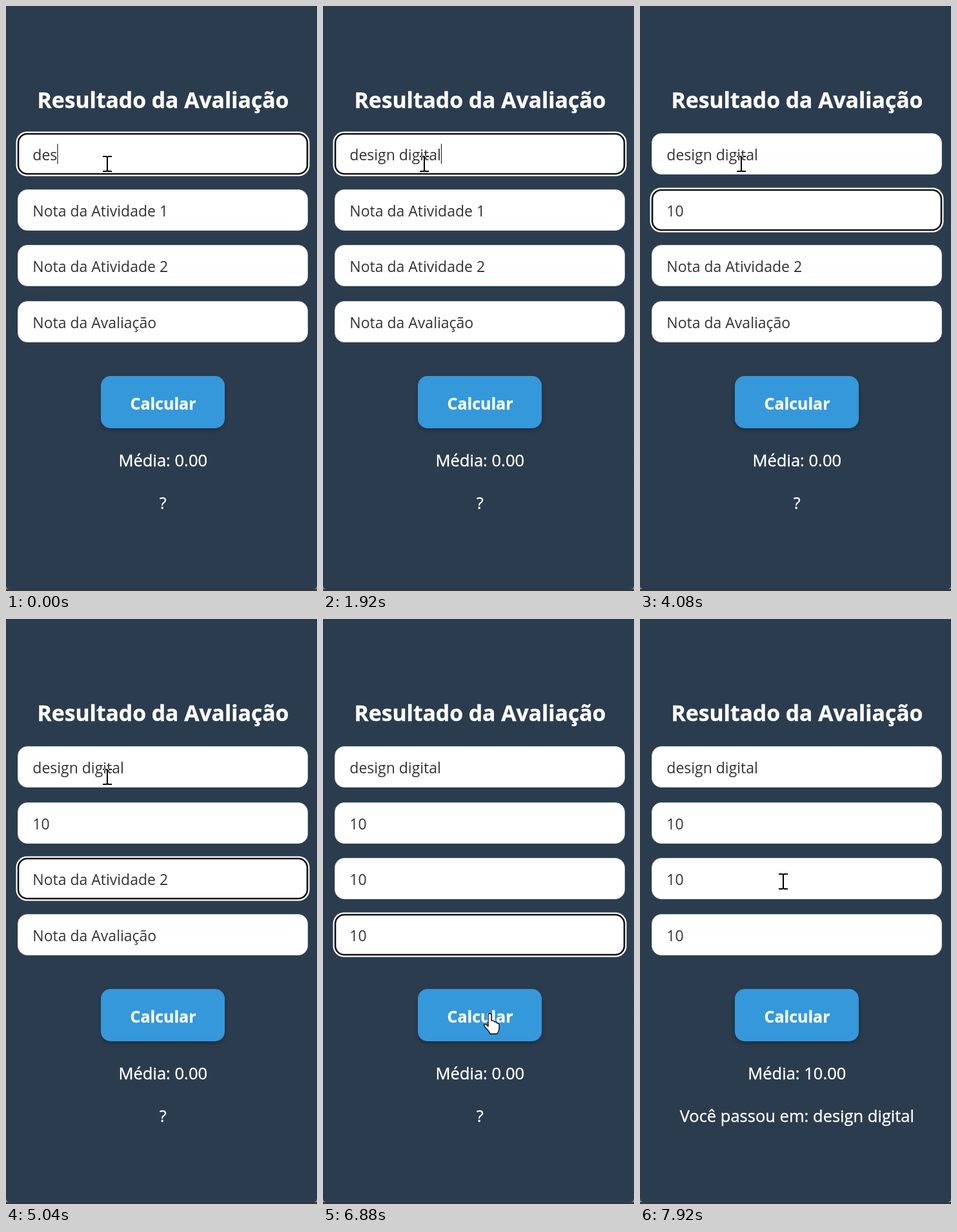
These frames come from a looping animation (482 by 906 pixels, 8 s). An HTML page:

```html
<!DOCTYPE html>
<html lang="pt-BR">
<head>
<meta charset="utf-8">
<title>Resultado da Avaliação</title>
<style>
  html, body { margin: 0; width: 100%; height: 100%; overflow: hidden; background: #8d9297; }
  svg { display: block; width: 482px; height: 906px; }
  text { font-family: "Open Sans", "Noto Sans", sans-serif; fill: #fff; white-space: pre; }
  .title { font-size: 33.7px; font-weight: 700; text-anchor: middle; stroke: #fff; stroke-width: .4; }
  .button { font-size: 25px; font-weight: 700; text-anchor: middle; stroke: #fff; stroke-width: .3; }
  .result { font-size: 25.5px; text-anchor: middle; stroke: #fff; stroke-width: .35; }
  .field text { font-size: 23px; fill: #333; }
  .box { fill: #fff; stroke: #d5d8dc; }
  .halo { fill: #fff; }
  .ring { fill: #fff; stroke: #101010; stroke-width: 2.6; }
  .caret { fill: #333; }
  .shadow { filter: drop-shadow(0 3px 3px rgba(0, 0, 0, .25)); }
  #ibeam { fill: none; stroke: #fff; stroke-width: 2; mix-blend-mode: difference; }
  #hand, #arrow { fill: #fff; stroke: #000; stroke-width: 1.3; stroke-linejoin: round; }
</style>
</head>
<body>
<svg viewBox="0 0 482 906">
  <path d="M0 0H482V897Q482 903 476 903H6Q0 903 0 897Z" fill="#2b3c4f"/>
  <path d="M0 903H482V906H0Z" fill="#33383e"/>
  <path d="M0 .5H482" stroke="#303a44"/>
  <path d="M481.5 0V897" stroke="#243240" stroke-dasharray="3 3"/>
  <text class="title" x="243.5" y="158">Resultado da Avaliação</text>
  <g id="form"></g>
  <rect class="shadow" x="147" y="573" width="192" height="81" rx="15" fill="#3498db"/>
  <text class="button" x="243.5" y="625">Calcular</text>
  <text class="result" id="mean" x="243.3" y="713"></text>
  <text class="result" id="verdict" x="243.3" y="779"></text>
  <path id="ibeam" d="M-7 -11H-2.5Q0 -11 0 -9Q0 -11 2.5 -11H7M0 -9V10M-7 12H-2.5Q0 12 0 10Q0 12 2.5 12H7"/>
  <path id="hand" d="M-2 1Q-2 -1 .5 -1Q3 -1 3 1V10Q7.5 9.5 7.5 12Q11.5 11.5 11.5 14Q15 13.5 15 17V22Q15 26 12 30.5H1Q-1 26 -5 22Q-9.5 17.5 -8 16Q-6 14.5 -2 19Z"/>
  <path id="arrow" d="M0 0V25L6 19.5L10 28.5L14 26.5L10.2 18H18Z"/>
</svg>
<script>
  const LOOP = 8000, CLICK = 6960, BLINK = 500, TEXT_X = 41.3;
  const $ = id => document.getElementById(id);

  // Each field: placeholder, typed value, focus time, time at which each key lands
  const subjectKeys = [...'design digital'].map((_, i) => Math.max(0, (i - 2) * 150));
  const fields = [
    { hint: 'Nome da Disciplina', value: 'design digital', focus: 0, keys: subjectKeys },
    { hint: 'Nota da Atividade 1', value: '10', focus: 2240, keys: [2720, 3200] },
    { hint: 'Nota da Atividade 2', value: '10', focus: 4500, keys: [5200, 5360] },
    { hint: 'Nota da Avaliação', value: '10', focus: 5600, keys: [5920, 6080] }
  ];

  function add(parent, tag, attrs) {
    const el = document.createElementNS('http://www.w3.org/2000/svg', tag);
    for (const k in attrs) el.setAttribute(k, attrs[k]);
    return parent.appendChild(el);
  }

  const show = (el, on) => el.style.display = on ? '' : 'none';
  const setText = (el, s) => { if (el.textContent !== s) el.textContent = s; };

  fields.forEach((f, i) => {
    f.top = Math.round(197 + i * 86.67);
    f.end = i < 3 ? fields[i + 1].focus : CLICK;
    const g = add($('form'), 'g', { class: 'field', transform: `translate(0 ${f.top})` });
    add(g, 'rect', { class: 'box', x: 18.5, y: .5, width: 449, height: 63, rx: 14.5 });
    f.outline = add(g, 'g', {});
    add(f.outline, 'rect', { class: 'halo', x: 15.5, y: -2.5, width: 455, height: 69, rx: 17 });
    add(f.outline, 'rect', { class: 'ring', x: 19, y: 1, width: 448, height: 62, rx: 14 });
    f.label = add(g, 'text', { x: TEXT_X, y: 42 });
    f.caret = add(g, 'rect', { class: 'caret', y: 16.5, width: 1.3, height: 31 });
  });

  function drawField(f, t) {
    const focused = t >= f.focus && t < f.end;
    const done = f.keys.filter(k => k <= t);
    const typed = f.value.slice(0, done.length);
    setText(f.label, typed || f.hint);
    show(f.outline, focused);
    const last = Math.max(f.focus, ...done);
    const lit = focused && (t - last) % (2 * BLINK) < BLINK;
    show(f.caret, lit);
    if (lit) f.caret.setAttribute('x', TEXT_X + (typed ? f.label.getComputedTextLength() : 0));
  }

  const stops = [
    { x: 157, y: 244 },
    { x: 258, y: 612, from: 6160, to: 6720 },
    { x: 222, y: 406, from: 7200, to: 7800 }
  ];

  function pointerAt(t) {
    let { x, y } = stops[0];
    for (const s of stops.slice(1)) {
      const p = Math.min(1, Math.max(0, (t - s.from) / (s.to - s.from)));
      const e = p * p * (3 - 2 * p);
      x += (s.x - x) * e;
      y += (s.y - y) * e;
    }
    return { x, y };
  }

  function drawPointer(t) {
    const { x, y } = pointerAt(t);
    const onField = fields.some(f => y >= f.top && y <= f.top + 64);
    const onButton = x >= 147 && x <= 339 && y >= 573 && y <= 654;
    const kind = onField ? 'ibeam' : onButton ? 'hand' : 'arrow';
    for (const id of ['ibeam', 'hand', 'arrow']) {
      show($(id), id === kind);
      $(id).setAttribute('transform', `translate(${x.toFixed(1)} ${y.toFixed(1)})`);
    }
  }

  function draw(now) {
    const t = now % LOOP;
    fields.forEach(f => drawField(f, t));
    setText($('mean'), t < CLICK ? 'Média: 0.00' : 'Média: 10.00');
    setText($('verdict'), t < CLICK ? '?' : 'Você passou em: design digital');
    drawPointer(t);
  }

  const start = performance.now();
  function tick() {
    draw(performance.now() - start);
    requestAnimationFrame(tick);
  }
  tick();
</script>
</body>
</html>
```
